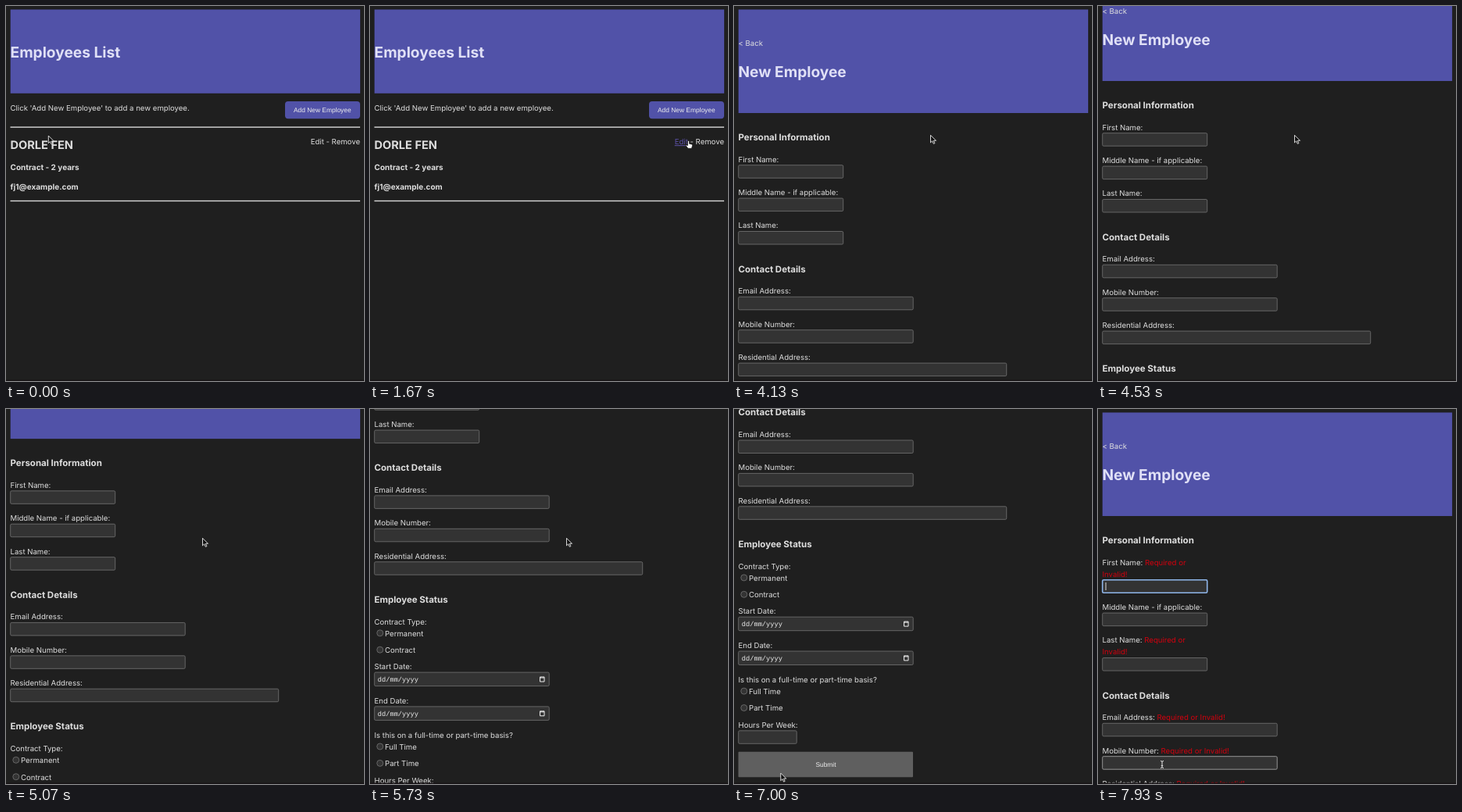
Recreate the animation shown at these times as an HTML page. Size 458 px wide and 480 px high, loop 8 s.

```html
<!DOCTYPE html>
<html lang="en">
<head>
<meta charset="utf-8">
<title>Employees</title>
<style>
  html, body { margin: 0; width: 100%; height: 100%; overflow: hidden; background: #1f1f1f; }
  svg { display: block; }
  text { font: 9.6px Inter, sans-serif; fill: #dedede; text-rendering: geometricPrecision; }
  .h1 { font-size: 19.15px; font-weight: 700; fill: #e0e0f6; }
  .h2 { font-size: 14.6px; font-weight: 700; }
  .h3 { font-size: 11.5px; font-weight: 700; }
  .h4 { font-size: 10px; font-weight: 700; }
  .btn { font: 8.4px "Liberation Sans", Arial, sans-serif; text-anchor: middle; fill: #eee; }
  .date { font: 8.7px "Liberation Mono", monospace; fill: #eee; }
  .error { fill: #d2000e; }
  .end { text-anchor: end; }
  .hover { fill: #5c51a8; text-decoration: underline; }
  .banner { fill: #5152a8; }
  .field { fill: #333; stroke: #6c6c6c; stroke-width: .9; }
  .focus { stroke: #8fb6ea; stroke-width: 1.6; }
  .over { stroke: #a2a2a2; }
  .rule { fill: #d8d8d8; }
</style>
</head>
<body>
<svg width="458" height="480" viewBox="0 0 458 480">
  <g id="list"></g>
  <g id="form"></g>
  <g id="invalid"></g>
  <rect y="478.5" width="458" height="1.5" fill="#181417"/>
  <g id="cursor">
    <path id="arrow" d="M0 0V9.6L2.2 7.5 3.8 11 5.4 10.3 3.8 7H7Z" fill="#111" stroke="#eee" stroke-width=".9"/>
    <path id="hand" d="M-1 1Q0-.6 1 1V4L4 4.6Q5.2 5 5 6.5L4 10H-.6L-3.4 6.4Q-3.2 5-1 6.2Z" fill="#fff" stroke="#111" stroke-width=".7"/>
    <path id="beam" d="M-2-4.5Q0-4.5 0-3.2Q0-4.5 2-4.5M0-3.5V3.5M-2 4.5Q0 4.5 0 3.2Q0 4.5 2 4.5M-1.2 1.5H1.2" fill="none" stroke="#e4e4e4"/>
  </g>
</svg>
<script>
const $ = id => document.getElementById(id);
const text = (x, y, str, cls = '') => `<text x="${x}" y="${y}" class="${cls}">${str}</text>`;
const rect = (x, y, w, h, cls, r = 0) =>
  `<rect x="${x}" y="${y}" width="${w}" height="${h}" rx="${r}" class="${cls}"/>`;

function listPage() {
  return rect(5.7, 4.5, 447.4, 107.3, 'banner') + text(5.5, 65.5, 'Employees List', 'h1')
    + text(5.5, 133.6, "Click 'Add New Employee' to add a new employee.")
    + rect(357, 122, 96, 22.2, 'banner', 4) + text(404.8, 135.7, 'Add New Employee', 'btn')
    + rect(5.5, 154.4, 447.5, 1.4, 'rule')
    + text(5.5, 182.8, 'DORLE FEN', 'h2')
    + text(453, 177.2, '<tspan id="edit">Edit</tspan> - <tspan id="remove">Remove</tspan>', 'end')
    + text(5.5, 209.8, 'Contract - 2 years', 'h4')
    + text(5.5, 234.8, 'fj1@example.com', 'h4')
    + rect(5.5, 248.8, 447.5, 1.4, 'rule');
}

function formPage(invalid) {
  let shift = 0, out = rect(5.7, 4.5, 447.4, 132.5, 'banner')
    + text(5.5, 51, '&lt; Back') + text(5.5, 90.6, 'New Employee', 'h1');
  const error = str => `<tspan class="error">${str}</tspan>`;
  const heading = (y, str) => out += text(5.5, y + shift, str, 'h3');
  const label = (y, str) => out += text(5.5, y + shift, str);
  const box = (y, w, cls = '', h = 16.5) => out += rect(5.7, y + shift, w, h, 'field ' + cls, 1.5);

  function field(y, str, w, required, cls) {
    const wrap = invalid && required && w < 150;
    label(y, str + (invalid && required ? ' ' + error(wrap ? 'Required or' : 'Required or Invalid!') : ''));
    if (wrap) {
      shift += 15;
      label(y, error('Invalid!'));
    }
    box(y + 4.1, w, invalid ? cls : '');
  }
  function radio(y, str) {
    out += `<circle cx="12.8" cy="${y + shift - 3.8}" r="4" class="field"/>` + text(19, y + shift, str);
  }
  function date(y, str) {
    label(y, str);
    box(y + 4.1, 223.5, '', 17.5);
    const top = y + shift + 10;
    out += text(9.8, y + shift + 15.8, 'dd/mm/yyyy', 'date')
      + `<path d="M217.5 ${top}h5.5v6h-5.5zM217.5 ${top + 1}h5.5" fill="none" stroke="#eee"/>`;
  }

  heading(172, 'Personal Information');
  field(199.6, 'First Name:', 134, true, 'focus');
  if (invalid) out += '<path id="caret" d="M10 222V232" stroke="#ddd"/>';
  field(242, 'Middle Name - if applicable:', 134);
  field(284.4, 'Last Name:', 134, true);
  heading(340.7, 'Contact Details');
  field(368.2, 'Email Address:', 223.5, true);
  field(410.6, 'Mobile Number:', 223.5, true, 'over');
  field(453, 'Residential Address:', 343, true);
  heading(509.2, 'Employee Status');
  label(537, 'Contract Type:');
  radio(552, 'Permanent');
  radio(573.4, 'Contract');
  date(594.4, 'Start Date:');
  date(638.2, 'End Date:');
  label(682, 'Is this on a full-time or part-time basis?');
  radio(697.2, 'Full Time');
  radio(718.6, 'Part Time');
  field(740, 'Hours Per Week:', 74.5);
  out += `<rect x="5.5" y="${771 + shift}" width="223.5" height="32.5" rx="1" fill="#5f5f5f"/>`
    + text(117.5, 790 + shift, 'Submit', 'btn');
  return out;
}

$('list').innerHTML = listPage();
$('form').innerHTML = formPage(false);
$('invalid').innerHTML = formPage(true);

// Keys are [tick, ...values], at 15 ticks per second
const PATH = [[0, 54.3, 166], [2, 55, 166.7], [5, 55, 166.7], [11, 340, 181], [13, 340, 181],
  [22, 401, 174], [24, 401, 174], [25, 407.5, 172.3], [32, 434, 172.5], [33, 434, 172.5],
  [38, 403, 132.5], [40, 403, 132.5], [45, 401, 136.5], [59, 401, 136.5], [62, 251.5, 165.3],
  [95, 251.5, 165.3], [104, 58, 467], [110, 82, 455]];
const SCROLL = [[66, 0], [70, 82], [75, 82], [79, 190], [83, 190], [88, 300.2], [91, 300.2], [95, 332.3]];
const OPEN_FORM = 52, REJECTED = 112, CARET_ON = 119, LOOP = 8000;

function track(keys, tick) {
  const next = keys.findIndex(key => key[0] > tick);
  if (next < 1) return keys.at(next && -1).slice(1);
  const [t0, ...from] = keys[next - 1], [t1, ...to] = keys[next];
  const p = (tick - t0) / (t1 - t0), eased = p * p * (3 - 2 * p);
  return from.map((v, i) => v + (to[i] - v) * eased);
}

const show = (id, on) => $(id).style.display = on ? '' : 'none';

function draw(now) {
  const tick = Math.floor((now % LOOP) * 0.015 + 0.05) % 120;
  const [x, y] = track(PATH, tick), [scroll] = track(SCROLL, tick);
  const onList = tick < OPEN_FORM, rejected = tick >= REJECTED;
  const onLinks = onList && y > 167 && y < 181;
  const onEdit = onLinks && x >= 389 && x < 408;
  const onRemove = onLinks && x >= 416;
  const onButton = onList && x > 357 && y > 122 && y < 144;
  const hand = onEdit || onRemove || onButton;

  show('list', onList);
  show('form', !onList && !rejected);
  show('invalid', rejected);
  show('caret', tick >= CARET_ON);
  show('hand', hand);
  show('beam', rejected);
  show('arrow', !hand && !rejected);
  $('edit').setAttribute('class', onEdit ? 'hover' : '');
  $('remove').setAttribute('class', onRemove ? 'hover' : '');
  $('form').setAttribute('transform', `translate(0 ${-scroll})`);
  $('cursor').setAttribute('transform', `translate(${x} ${y})`);
  requestAnimationFrame(draw);
}
requestAnimationFrame(draw);
</script>
</body>
</html>
```
